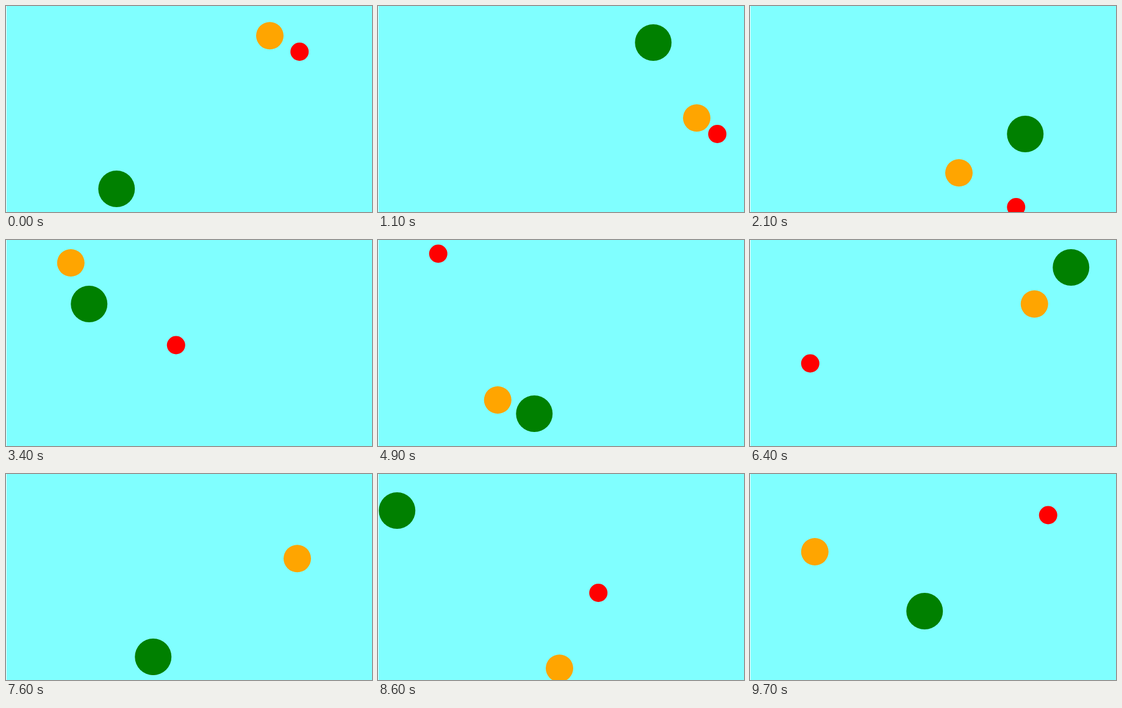
An HTML page with a canvas that plays this animation: 600 px wide and 338 px high, repeating every 9.8 s.

```html
<!DOCTYPE html>
<html lang="en">
<head>
<meta charset="utf-8">
<title>Bouncing balls</title>
<style>
  html, body { margin: 0; width: 600px; height: 338px; overflow: hidden; background: #80ffff; }
  canvas { display: block; }
</style>
</head>
<body>
<canvas id="stage" width="600" height="338"></canvas>
<script>
const ctx = document.getElementById('stage').getContext('2d');

const FRAME_MS = 100;
const FRAMES = 98;
const TICKS_PER_FRAME = 1.599; // the balls step on a faster clock than the picture
const TICK_PHASE = 0.89;
const SCALE = 0.75;
const LEFT = 1.25;

// Each axis: start, direction, and the two turning points.
const balls = [
  { color: '#ff0000', radius: 20, step: 10, x: [640, 1, 10, 780], y: [100, 1, 10, 440] },
  { color: '#ffa500', radius: 30, step: 15, x: [575, 1, 20, 770], y: [65, -1, 20, 425] },
  { color: '#008000', radius: 40, step: 20, x: [240, 1, 20, 760], y: [400, 1, 20, 420] }
];

function bounce([start, direction, low, high], distance) {
  const span = high - low;
  const cycle = 2 * span;
  const along = (((start + direction * distance - low) % cycle) + cycle) % cycle;
  return low + (along > span ? cycle - along : along);
}

function draw(now) {
  const frame = Math.floor(now / FRAME_MS) % FRAMES;
  const tick = Math.floor(frame * TICKS_PER_FRAME + TICK_PHASE);

  ctx.setTransform(1, 0, 0, 1, 0, 0);
  ctx.fillStyle = '#80ffff';
  ctx.fillRect(0, 0, 600, 338);

  ctx.setTransform(SCALE, 0, 0, SCALE, LEFT, 0);
  for (const { color, radius, step, x, y } of balls) {
    ctx.fillStyle = color;
    ctx.beginPath();
    ctx.arc(bounce(x, tick * step), bounce(y, tick * step), radius, 0, 2 * Math.PI);
    ctx.fill();
  }

  ctx.setTransform(1, 0, 0, 1, 0, 0);
  ctx.fillStyle = '#f0ffff';
  ctx.fillRect(0, 0, 1, 338);
}

function loop() {
  draw(performance.now());
  requestAnimationFrame(loop);
}
loop();
</script>
</body>
</html>
```
